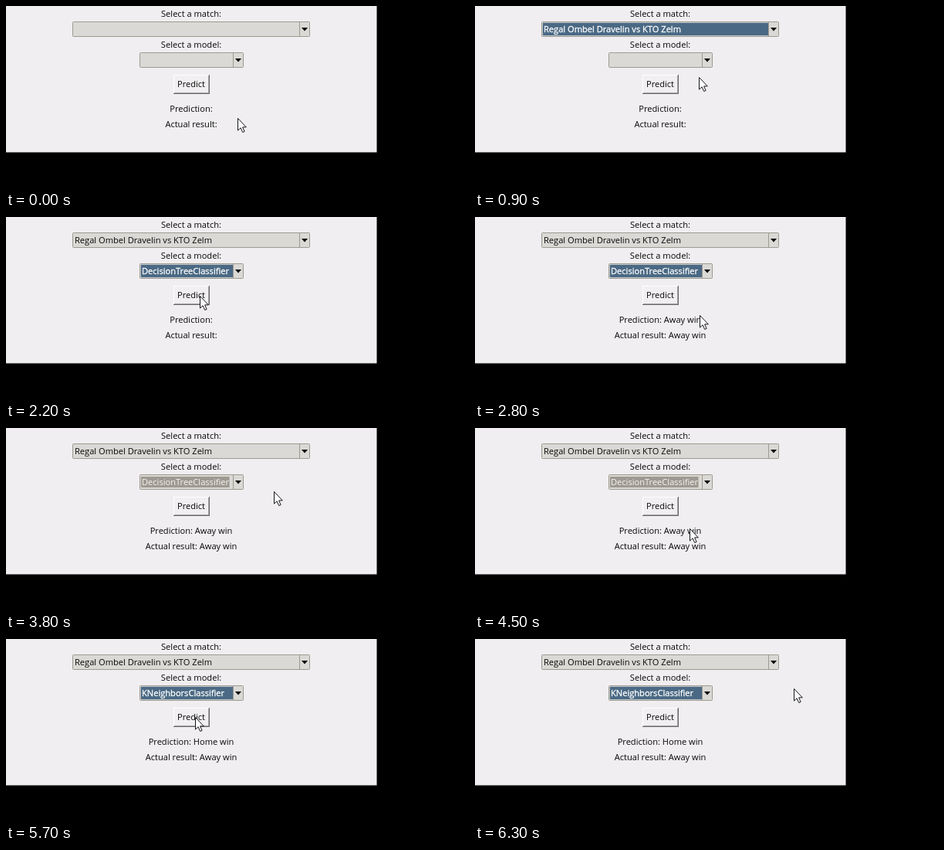
An HTML page that plays this animation: 600x237 px, repeating every 6400 ms.

```html
<!DOCTYPE html>
<html lang="en">
<head>
<meta charset="utf-8">
<title>Match prediction</title>
<style>
  html, body { margin: 0; width: 100%; height: 100%; overflow: hidden; background: #000; }
  svg { display: block; width: 600px; height: 237px; }
  text { font: 11.1px "Open Sans", "Noto Sans", sans-serif; fill: #080808; white-space: pre; }
  .mid { text-anchor: middle; }
  .box { fill: #dad9d5; stroke: #9e9a91; }
  .fill { fill: none; }
  .focus .fill { fill: #4a6984; stroke: #e4e4e2; stroke-width: .6; }
  .focus text { fill: #fff; stroke: #fff; stroke-width: .3; }
  .mark { fill: none; }
  .blur .mark { fill: #9e9a91; }
  .blur text { fill: #f6f5f0; }
</style>
</head>
<body>
<svg viewBox="0 0 600 237">
  <rect width="600" height="237"/>
  <rect width="480.5" height="189.5" fill="#f0eef0"/>
  <text class="mid" x="240" y="14">Select a match:</text>
  <g id="match"></g>
  <text class="mid" x="240" y="54">Select a model:</text>
  <g id="model"></g>
  <g id="button">
    <rect x="217" y="89" width="47" height="25" fill="#696969"/>
    <rect x="217" y="89" width="46" height="24" fill="#fff"/>
    <rect x="218" y="90" width="45" height="23" fill="#a5a3a5"/>
    <rect x="218" y="90" width="44" height="22" fill="#f1eff1"/>
    <text class="mid" x="240" y="105">Predict</text>
  </g>
  <text class="mid" id="guess" x="240" y="137"></text>
  <text class="mid" id="actual" x="240" y="157"></text>
  <path id="cursor" d="M0 0V15.6L3.6 12.3L6.2 18L8.6 17L6.1 11.4H10.8Z"
        fill="#fff" stroke="#15151c" stroke-width="1"/>
</svg>
<script>
const LOOP = 6400, STEP = 100;
const $ = id => document.getElementById(id);

// [time, match state, model state, model, prediction, actual result]
const MATCH = "Regal Ombel Dravelin vs KTO Zelm";
const TREE = "DecisionTreeClassifier", KNN = "KNeighborsClassifier";
const states = [
  [0,    "", "", "", "", "", ""],
  [700,  MATCH, "focus", "", "", "", ""],
  [1400, MATCH, "blur", "", "", "", ""],
  [2000, MATCH, "", TREE, "focus", "", ""],
  [2500, MATCH, "", TREE, "focus", " Away win", " Away win"],
  [3400, MATCH, "", TREE, "blur", " Away win", " Away win"],
  [4700, MATCH, "", KNN, "focus", " Away win", " Away win"],
  [5600, MATCH, "", KNN, "focus", " Home win", " Away win"]
];

// [time, x, y] of the pointer tip
const path = [
  [0, 301, 146], [400, 300, 30], [700, 292, 88], [900, 291, 93],
  [1300, 287, 68], [1400, 287, 68], [1700, 285, 116], [2000, 270, 104],
  [2300, 246, 102], [2500, 246, 102], [2800, 292, 128],
  [3300, 350, 30], [3400, 350, 30], [3800, 348, 83], [4300, 286, 70],
  [4600, 276, 152], [4700, 276, 150], [5100, 326, 130],
  [5500, 246, 102], [5700, 246, 102], [6300, 414, 65]
];

function combo(id, x, y, w) {
  const ax = x + w - 7;
  const g = $(id);
  g.innerHTML = `
    <rect class="box" x="${x + .5}" y="${y + .5}" width="${w - 1}" height="19" rx="1"/>
    <rect class="fill" x="${x + 1.5}" y="${y + 1.5}" width="${w - 15}" height="17"/>
    <rect class="mark" x="${x + 2}" y="${y + 3}" width="0" height="14"/>
    <path d="M${x + w - 13.5} ${y + 1}v18" stroke="#9e9a91"/>
    <path d="M${ax - 4} ${y + 8}h8l-4 4.5z"/>
    <text x="${x + 3}" y="${y + 14}"></text>`;
  const label = g.querySelector("text"), mark = g.querySelector(".mark");
  return (value, state) => {
    g.setAttribute("class", state);
    if (label.textContent !== value) label.textContent = value;
    mark.setAttribute("width", value ? label.getComputedTextLength() + 1.5 : 0);
  };
}

const setMatch = combo("match", 86, 20, 308);
const setModel = combo("model", 173, 60, 135);

function pointer(t) {
  const i = Math.max(1, path.findIndex(p => p[0] >= t));
  const [t0, x0, y0] = path[i - 1], [t1, x1, y1] = path[i];
  const u = (t - t0) / (t1 - t0), k = u * u * (3 - 2 * u);
  return [x0 + (x1 - x0) * k, y0 + (y1 - y0) * k];
}

function draw(t) {
  const [, match, matchState, model, modelState, guess, actual] =
    states.filter(s => s[0] <= t).pop();
  setMatch(match, matchState);
  setModel(model, modelState);
  $("guess").textContent = "Prediction:" + guess;
  $("actual").textContent = "Actual result:" + actual;
  const [x, y] = pointer(t).map(Math.round);
  $("cursor").setAttribute("transform", `translate(${x - .5} ${y - .5})`);
}

const start = performance.now();
let last = -1;
function tick(now) {
  const t = Math.floor(Math.max(0, now - start) % LOOP / STEP) * STEP;
  if (t !== last) draw(last = t);
  requestAnimationFrame(tick);
}
draw(0);
requestAnimationFrame(tick);
</script>
</body>
</html>
```
